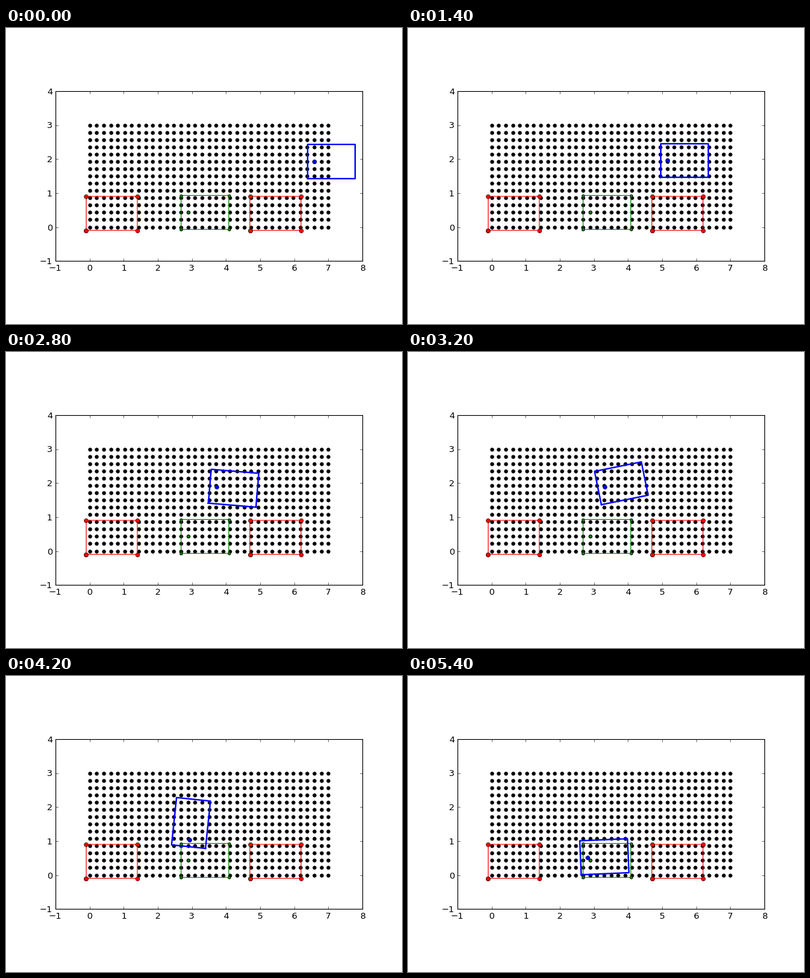
These frames come from a looping animation (600x450 px, 5.44 s). A matplotlib script:

```python
import numpy as np
import matplotlib.pyplot as plt
from matplotlib.animation import FuncAnimation

plt.rcParams.update({"font.family": "DejaVu Sans", "font.size": 12})

NX, NY = 35, 15
LENGTH, WIDTH, AXLE = 1.4, 1.0, 0.2   # axle: distance from the rear edge
STEP = 0.205                          # distance driven per move
HOLD = 5                              # 40 ms ticks per move
TICKS = 136
BACKWARD_MOVES = 25

# Heading in degrees after each move
HEADINGS = np.radians([
    0, 2.5, 2.5, 0, -3.8, -4, -5, 0, 3, 4.5, 8.1, 5, 2, -1, -4.8, -4.6,
    11.5, 39.5, 67.5, 82, 88, 84, 67, 41, 32, 23, 5, 2.5])

xs, ys = np.linspace(0, 7, NX), np.linspace(0, 3, NY)
start = np.array([xs[32], ys[9]])
goal = np.array([xs[14], ys[2]])


def drive():
    """Rear axle position after each move: back up, then pull forward."""
    mid = (HEADINGS[1:] + HEADINGS[:-1]) / 2
    gear = np.where(np.arange(len(mid)) < BACKWARD_MOVES, -1, 1)
    moves = STEP * gear[:, None] * np.column_stack([np.cos(mid), np.sin(mid)])
    return np.vstack([start, start + np.cumsum(moves, axis=0)])


def box(x, y, w, h):
    return (np.array([x, x + w, x + w, x, x]),
            np.array([y, y, y + h, y + h, y]))


def car_outline(pos, angle):
    u, v = box(-AXLE, -WIDTH / 2, LENGTH, WIDTH)
    c, s = np.cos(angle), np.sin(angle)
    return pos[0] + c * u - s * v, pos[1] + s * u + c * v


fig = plt.figure(figsize=(7.5, 5.625), dpi=80, facecolor="white")
ax = fig.add_axes([0.125, 0.1, 0.775, 0.8])
ax.set_aspect("equal")
ax.set(xlim=(-1, 8), ylim=(-1, 4), xticks=range(-1, 9), yticks=range(-1, 5))
ax.tick_params(direction="in", length=4, width=0.5, pad=4, top=True, right=True)
for spine in ax.spines.values():
    spine.set_linewidth(1)

marker = dict(marker="o", mec="black", mew=0.5)
outline = dict(lw=1, snap=False, **marker)
gx, gy = np.meshgrid(xs, ys)
ax.plot(gx.ravel(), gy.ravel(), ls="", color="black", ms=4.8, **marker)
for x in (-0.1, 4.7):
    ax.plot(*box(x, -0.1, 1.5, 1), color="red", ms=5.6, **outline)
ax.plot(*car_outline(goal, 0), color="green", ms=4, **outline)
ax.plot(*goal, color="green", ms=4, **marker)
body, = ax.plot([], [], color="blue", lw=2)
axle, = ax.plot([], [], color="blue", ms=5.6, **marker)

path = drive()


def update(tick):
    i = tick // HOLD
    body.set_data(*car_outline(path[i], HEADINGS[i]))
    axle.set_data([path[i, 0]], [path[i, 1]])
    return body, axle


anim = FuncAnimation(fig, update, frames=TICKS, interval=40,
                     repeat=True, repeat_delay=0, blit=False)
plt.show()
```
